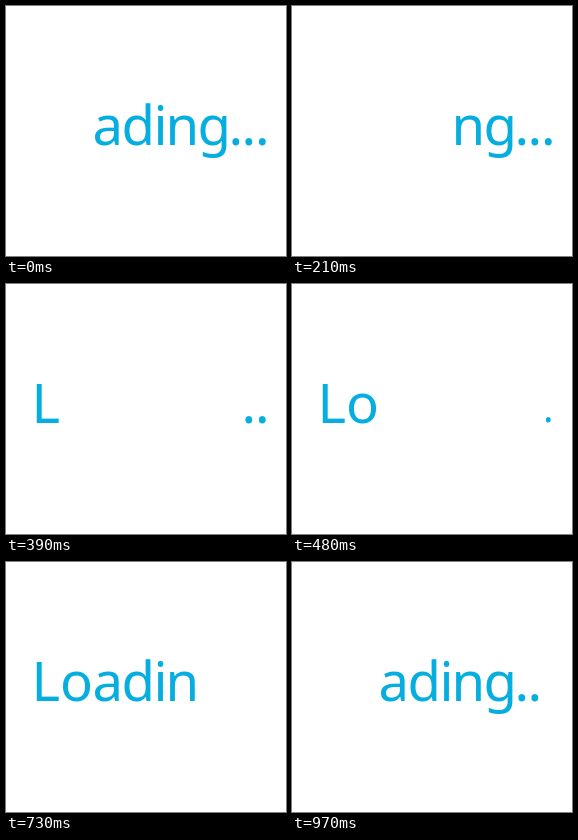
Animation of 280x250 px, one loop 1000 ms. Source, as an HTML page with a canvas:

```html
<!DOCTYPE html>
<html lang="en">
<head>
<meta charset="utf-8">
<title>Loading</title>
<style>
html, body { margin: 0; width: 100%; height: 100%; overflow: hidden; background: #fff; }
canvas { display: block; }
</style>
</head>
<body>
<canvas id="stage" width="280" height="250"></canvas>
<script>
const ctx = document.getElementById('stage').getContext('2d');
const LOOP = 1000, THIN = 25, BASELINE = 139;

// character, centre x, time it appears, time it starts to vanish
const glyphs = [
  ['L', 42, 360, 880],
  ['o', 71, 420, 940],
  ['a', 101, 520, 60],
  ['d', 131.5, 580, 120],
  ['i', 154.5, 640, 180],
  ['n', 176.5, 700, 240],
  ['g', 207.5, 790, 300],
  ['.', 229.5, 880, 360],
  ['.', 242.5, 940, 420],
  ['.', 256, 975, 480]
];

const wrap = t => (t + LOOP) % LOOP;

// Short steps while erasing, longer ones while typing
function step(t) {
  if (t < 520) return Math.min(Math.floor(t / 30) * 30, 480);
  if (t < 550) return 520;
  return 550 + Math.floor((t - 550) / 60) * 60;
}

function drawGlyph([char, centre, show, hide], t) {
  const age = wrap(t - show), life = wrap(hide - show);
  if (age >= life + THIN) return;
  const m = ctx.measureText(char);
  const x = centre + (m.actualBoundingBoxLeft - m.actualBoundingBoxRight) / 2;
  ctx.fillText(char, x, BASELINE);
  // A white outline wears the strokes down
  if (age < THIN || age >= life) ctx.strokeText(char, x, BASELINE);
}

function draw(now) {
  const t = step(now % LOOP);
  ctx.fillStyle = '#fff';
  ctx.fillRect(0, 0, 280, 250);
  ctx.font = '300 54.5px "Noto Sans", "Open Sans", sans-serif';
  ctx.fillStyle = '#06aee0';
  ctx.strokeStyle = '#fff';
  ctx.lineWidth = 2;
  ctx.lineJoin = 'round';
  glyphs.forEach(g => drawGlyph(g, t));
}

const start = performance.now();
function tick() {
  draw(performance.now() - start);
  requestAnimationFrame(tick);
}
tick();
</script>
</body>
</html>
```
